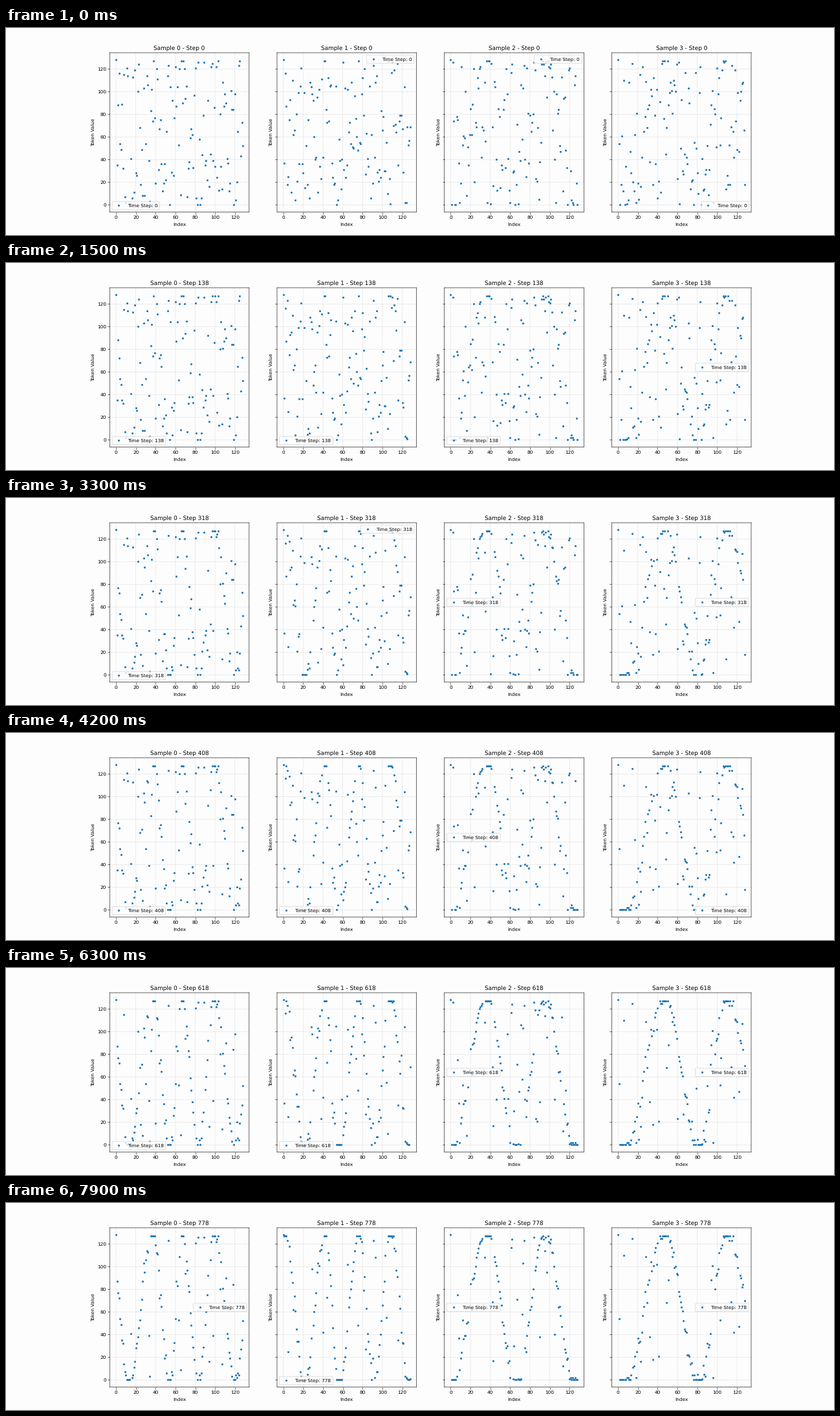
Recreate the animation shown at these times as a matplotlib script. Size 1280 by 320 pixels, loop 8000 ms.

```python
import numpy as np
import matplotlib.pyplot as plt
from matplotlib.animation import FuncAnimation

FRAMES, INTERVAL = 80, 100
TOKENS, TOP = 129, 127
LAST_STEP = 778
PAPER, BLUE = "#fdfdfd", "#1f77b4"

plt.rcParams.update({
    "font.family": "DejaVu Sans",
    "figure.facecolor": PAPER,
    "axes.facecolor": PAPER,
    "axes.axisbelow": True,
    "path.snap": False,
    "text.hinting": "none",
})

# Per sample: height at the first turn (1 crest, -1 trough), where the wave
# turns, and the (first frame, place) pairs of the legend.
SAMPLES = [
    (1, (-6, 13, 37, 54, 67, 83, 99, 121, 138),
     [(0, "lower left"), (70, "center right")]),
    (1, (2, 21, 42, 56, 77, 91, 108, 127, 146),
     [(0, "upper right"), (8, "lower left"),
      (20, "upper right"), (34, "lower left")]),
    (-1, (1, 36, 66, 95, 125, 155),
     [(0, "upper right"), (8, "lower left"), (20, "center left")]),
    (-1, (6, 47, 81, 110, 148),
     [(0, "lower right"), (8, "center right"),
      (34, "lower right"), (57, "center right")]),
]


def step_at(frame):
    return max(4 * frame, 10 * frame - 12)


def wave(x, first, turns):
    """Cosine that reaches a crest or trough at every turn, clipped flat."""
    phase = np.pi * np.interp(x, turns, range(len(turns)))
    return TOP / 2 + first * 68 * np.cos(phase)


class Sample:
    """Random tokens that settle one by one onto a wave."""

    def __init__(self, ax, number):
        rng = np.random.default_rng(40 + number)
        first, turns, self.spots = SAMPLES[number]
        self.number = number
        self.index = np.arange(TOKENS)
        clean = wave(self.index, first, turns) + rng.normal(0, 4, TOKENS)
        self.clean = np.clip(np.round(clean), 0, TOP)
        self.noise = rng.integers(0, TOP + 1, TOKENS)
        self.clean[0] = self.noise[0] = 128
        # A quarter are settled at the start, a few never settle.
        self.settle = (0.75 - rng.random(TOKENS)) / 0.6 * LAST_STEP

        self.dots = ax.scatter(self.index, self.noise, s=10, color=BLUE,
                               label="Time Step: 0")
        self.title = ax.set_title("")
        self.legend = ax.legend(loc="upper right")
        ax.set(xlim=(-6.4, 134.4), ylim=(-6.4, 134.4),
               xticks=range(0, 121, 20), yticks=range(0, 121, 20))
        ax.set_xlabel("Index", labelpad=5.5)
        ax.set_ylabel("Token Value")
        ax.grid(True, linestyle="--", alpha=0.5)

    def update(self, frame):
        step = step_at(frame)
        value = np.where(self.settle <= step, self.clean, self.noise)
        self.dots.set_offsets(np.column_stack([self.index, value]))
        self.title.set_text(f"Sample {self.number} - Step {step}")
        self.legend.get_texts()[0].set_text(f"Time Step: {step}")
        self.legend.set_loc([loc for start, loc in self.spots
                             if start <= frame][-1])


fig, axes = plt.subplots(1, 4, sharey=True, figsize=(24, 6), dpi=160 / 3)
fig.subplots_adjust(left=0.1252, right=0.9, bottom=0.1108, top=0.8808)
samples = [Sample(ax, i) for i, ax in enumerate(axes)]


def draw(frame):
    for sample in samples:
        sample.update(frame)
    return []


anim = FuncAnimation(fig, draw, frames=FRAMES, interval=INTERVAL,
                     init_func=lambda: draw(0), repeat=True)
plt.show()
```
